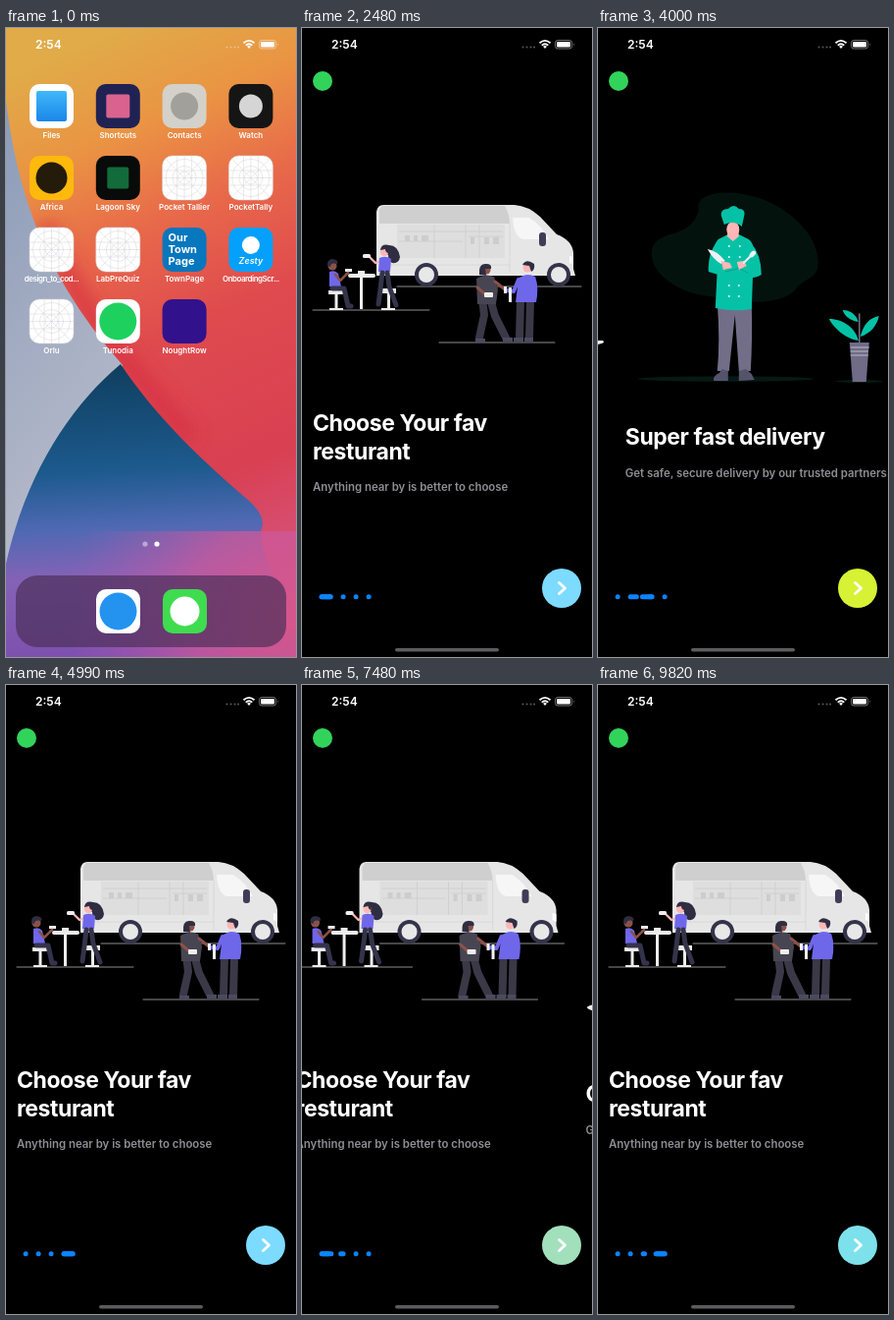
An HTML page for the animation above (9920 ms loop, 296 by 640 pixels).

```html
<!DOCTYPE html>
<html lang="en">
<head>
<meta charset="utf-8">
<title>Onboarding</title>
<style>
  html, body { margin: 0; width: 100%; height: 100%; overflow: hidden; background: #000; }
  svg { display: block; width: 100vw; height: 100vh; }
  text { font-family: Inter, "Noto Sans", sans-serif; fill: #fff; }
  .title { font-size: 23px; font-weight: 700; letter-spacing: -.45px; }
  .sub { font-size: 11.4px; font-weight: 600; fill: #8e8e93; }
  .label { font-size: 8px; font-weight: 600; text-anchor: middle; }
  .line { fill: none; stroke-linecap: round; stroke-linejoin: round; }
</style>
</head>
<body>
<svg viewBox="0 0 296 640">
<defs>
  <linearGradient id="warm" x1=".4" y1="0" x2=".6" y2="1">
    <stop offset="0" stop-color="#e0ab48"/><stop offset=".16" stop-color="#ea9443"/>
    <stop offset=".32" stop-color="#e8694a"/><stop offset=".5" stop-color="#df4a4e"/>
    <stop offset=".75" stop-color="#d94052"/><stop offset="1" stop-color="#d45a8c"/>
  </linearGradient>
  <linearGradient id="mist" x1="0" y1="0" x2=".3" y2="1">
    <stop offset="0" stop-color="#8b9bb8"/><stop offset="1" stop-color="#b9bccb"/>
  </linearGradient>
  <linearGradient id="sea" x1=".45" y1="0" x2=".5" y2="1">
    <stop offset="0" stop-color="#0f3f5f"/><stop offset=".36" stop-color="#1d5a8e"/>
    <stop offset=".55" stop-color="#4f69b3"/><stop offset=".72" stop-color="#8562b6"/>
    <stop offset="1" stop-color="#7d4fae"/>
  </linearGradient>
  <radialGradient id="blush" gradientUnits="userSpaceOnUse" cx="290" cy="600" r="230">
    <stop offset="0" stop-color="#d6568a"/><stop offset=".45" stop-color="#cb589b" stop-opacity=".75"/>
    <stop offset="1" stop-color="#a85ab0" stop-opacity="0"/>
  </radialGradient>
  <linearGradient id="files" x1="0" y1="0" x2="0" y2="1">
    <stop offset="0" stop-color="#3fb8f7"/><stop offset="1" stop-color="#1a86ea"/>
  </linearGradient>
  <filter id="soft" x="-50%" y="-50%" width="200%" height="200%"><feGaussianBlur stdDeviation="9"/></filter>
  <g id="blank" class="line" stroke="#d2d2d6" stroke-width=".5">
    <rect width="45" height="45" rx="10" fill="#fff"/>
    <path d="M0 22.5H45M22.5 0V45M3 3L42 42M42 3L3 42M15 0V45M30 0V45M0 15H45M0 30H45"/>
    <circle cx="22.5" cy="22.5" r="19"/><circle cx="22.5" cy="22.5" r="12"/><circle cx="22.5" cy="22.5" r="6.5"/>
  </g>
</defs>

<g id="home">
  <rect width="296" height="640" fill="url(#warm)"/>
  <path d="M40 200Q70 280 130 348L190 420" fill="none" stroke="#d62f42" stroke-width="20" opacity=".7" filter="url(#soft)"/>
  <path d="M0 74C9 150 30 212 62 266Q86 306 119 343L100 420L0 560Z" fill="url(#mist)"/>
  <path d="M117 342C154 398 207 446 248 481Q267 498 260 512C262 550 285 570 296 590V640H0V545C20 455 65 385 117 342Z" fill="url(#sea)"/>
  <rect y="512" width="296" height="128" fill="url(#blush)"/>
  <circle cx="142" cy="525" r="2.6" fill="#fff" opacity=".45"/><circle cx="154" cy="525" r="2.6" fill="#fff"/>
  <rect x="10" y="557" width="276" height="73" rx="22" fill="#4a2f58" opacity=".68"/>
  <g id="icons"></g>
  <rect id="iconShade" x="227" y="203" width="45" height="45" rx="10" opacity="0"/>
</g>
<rect id="veil" width="296" height="640" opacity="0"/>
<rect id="sheet"/>
<rect id="sheetTint" fill="#05a0fb"/>

<g id="app">
  <g id="pages">
    <g id="restaurant">
      <g class="line" stroke="#8d8d92" stroke-width="1"><path d="M97 263H285M11 287H130M140 320H258"/></g>
      <path d="M83 180H217Q231 181 243 192L260 210Q276 216 277 229V245L279 252H76V187Q77 180 83 180Z" fill="#e6e6e6"/>
      <path d="M82 181H207Q212 190 212 199H79V185Z" fill="#cfcfcf"/>
      <rect x="97" y="200" width="110" height="34" fill="#dedede"/>
      <path d="M99 207H205M99 217H164M170 212H205M135 200V234M167 200V234M181 200V234" stroke="#d0d0d0" fill="none"/>
      <path d="M105 211h5v6h-5zm9 0h4v6h-4zm8 0h7v6h-7zm50 2h4v7h-4zm14 0h5v7h-5zm9 0h6v7h-6z" fill="#cdcdcd"/>
      <path d="M215 193H232Q246 202 252 215H226Q216 213 215 193Z" fill="#f6f6f6"/>
      <rect x="242" y="208" width="7" height="14" rx="3" fill="#3f3d56"/>
      <path d="M77 241H213M212 199V249" stroke="#d8d8d8"/>
      <path d="M273 232l4 1v8l-4-2z" fill="#fff"/>
      <g fill="#e8e8e8" stroke="#35334a" stroke-width="4"><circle cx="127" cy="251" r="10"/><circle cx="262" cy="251" r="10"/></g>
      <g fill="#ececec">
        <rect x="47" y="250" width="28" height="4" rx="2"/><rect x="59" y="253" width="3" height="33"/>
        <path d="M27 267H43V271H36.500V285H42V287H28V285H33.500V271H27ZM80 265H96V270H90V285H95V287H81V285H87V270H80Z"/>
        <path d="M57 247h7v3h-7zM44 245h7v3h-7z"/>
      </g>
      <g>
        <circle cx="31" cy="242" r="4.500" fill="#8b5148"/><path d="M26 242Q25 236 31 235Q38 236 36 240Q29 238 29 243Z" fill="#2f2e41"/>
        <path d="M28 248Q34 246 37 250L40 263H28Z" fill="#6f67ea"/>
        <path class="line" d="M34 251L39 257L47 249" stroke="#8b5148" stroke-width="2.500"/>
        <path class="line" d="M31 265H43L47 283H50" stroke="#35334a" stroke-width="5"/>
      </g>
      <g>
        <path d="M80 226Q81 219 89 221Q98 221 100 233Q99 240 92 239Q88 237 88 231Z" fill="#2f2e41"/>
        <circle cx="84" cy="228" r="4" fill="#ffb6b6"/><path d="M80 226Q82 220 88 224L88 229Q85 228 85 225Z" fill="#2f2e41"/>
        <path class="line" d="M82 236L75 239L68 232" stroke="#ffb6b6" stroke-width="2.200"/>
        <path d="M79 234Q86 231 91 235L90 248H78Z" fill="#6f67ea"/>
        <path class="line" d="M82 249L80 266L78 281M87 249L89 263L96 282" stroke="#35334a" stroke-width="5"/>
        <rect x="62" y="230" width="8" height="4" rx="1.500" fill="#eee"/>
      </g>
      <g>
        <path class="line" d="M184 275L186 292L181 315M192 275L197 293L208 315" stroke="#3b3947" stroke-width="8"/>
        <path d="M178 255Q187 249 196 253L200 266L198 281H179Z" fill="#474551"/>
        <circle cx="188" cy="246" r="4.500" fill="#8b5148"/><path d="M181 251Q180 239 188 240Q194 240 193 245H187L188 252Z" fill="#2f2e41"/>
        <path class="line" d="M179 264L187 271M197 258L207 266" stroke="#8b5148" stroke-width="3"/>
        <rect x="186" y="269" width="9" height="5" rx="1" fill="#eee"/>
        <path d="M177 316h10v4h-10zm28-1h10v4h-10z" fill="#4c4a60"/>
      </g>
      <g>
        <path class="line" d="M223 278L222 315M233 278L232 315" stroke="#3b3947" stroke-width="8"/>
        <path d="M221 255Q229 248 238 253Q242 263 239 279H218Z" fill="#6f67ea"/>
        <path class="line" d="M221 256L216 268L209 267" stroke="#6f67ea" stroke-width="4"/>
        <circle cx="230" cy="244" r="4.500" fill="#ffb6b6"/><path d="M225 241Q229 234 237 240Q238 246 234 248L232 242Z" fill="#2f2e41"/>
        <path d="M206 263h3v7h-3zm5 1h3v15h-3z" fill="#f2f2f5"/>
        <path d="M216 315h10v4h-10zm11 0h9v4h-9z" fill="#4c4a60"/>
      </g>
      <text class="title" x="11" y="410">Choose Your fav</text>
      <text class="title" x="11" y="438.500">resturant</text>
      <text class="sub" x="11" y="470.500">Anything near by is better to choose</text>
    </g>

    <g transform="translate(298)">
      <path d="M10 328Q16 323 36 325L75 319L282 318Q287 321 271 323Q246 326 267 327Q276 330 268 333H229Q218 337 232 338Q229 341 185 339L67 335Q52 338 35 333Q13 333 10 328Z" fill="#f0f0f0"/>
      <path d="M94 302Q152 296 210 301L211 318Q195 326 154 325H100Q92 325 94 302Z" fill="#3f3d56"/>
      <path d="M91 291Q84 283 98 279L198 272Q206 278 212 280Q222 292 217 300L208 298L200 305Q190 300 180 305Q170 300 160 304Q150 299 140 304L132 300L122 305Q114 297 107 305L98 298L88 300Z" fill="#69b24e"/>
      <path d="M98 253Q87 256 89 270Q91 283 104 282L124 265ZM126 285Q148 293 173 278L160 270Z" fill="#e0575f"/>
      <path d="M101 257Q94 261 98 272Q105 278 117 270L110 257Z" fill="#e98288"/>
      <path d="M107 271Q136 276 166 270L212 253Q215 267 201 274Q171 284 132 278Z" fill="#61403f"/>
      <path d="M110 266L161 265L128 279L92 300Q91 295 100 282Z" fill="#f9d35c"/>
      <path d="M105 260Q156 265 209 253L211 259Q187 267 150 264Q122 272 105 260Z" fill="#69b24e"/>
      <path d="M98 258C95 232 122 209 153 209C188 209 208 232 210 253Q164 264 107 261Q99 262 98 258Z" fill="#45435c"/>
      <g class="line" stroke="#f1f1f1" stroke-width="2"><path d="M117 230l2-2m6-5l2-1m7 1l2-2m5-5l2 1m3 6l1-3m6-4l2 1m-4 8l2 2m10-10l2 1m-1 8l2 1m6-4l2 2"/></g>
      <path d="M54 319C42 314 35 302 34 293C45 298 53 308 54 319ZM55 318C57 303 67 289 81 285C78 298 68 312 55 318Z" fill="#484659"/>
      <path d="M54 319Q40 312 34 295M56 319C57 303 66 290 79 286" class="line" stroke="#0bb59e" stroke-width="1.500"/>
      <path d="M51 324l1-6h7l2 6z" fill="#aaa"/>
      <g>
        <path d="M221 245H246L248 270L254 314H242L235 268L231 316H221Q224 290 220 262Z" fill="#413f57"/>
        <path d="M214 320Q214 315 222 315L225 311L232 315V321H214ZM239 321L242 314L249 311L257 319Q256 322 239 321Z" fill="#51506f"/>
        <path class="line" d="M224 221L220 239L212 260M248 220L249 236L243 248" stroke="#ffb6b6" stroke-width="5"/>
        <path d="M224 211Q233 205 244 208Q252 214 251 228L247 249L222 248L225 231L220 225Q220 216 224 211Z" fill="#05c2a7"/>
        <path d="M225 196Q231 194 236 200L235 209L228 207Z" fill="#ffb6b6"/>
        <path d="M223 197Q223 190 232 189Q243 190 241 198Q238 205 234 201L231 196Z" fill="#3f3d56"/>
      </g>
      <text class="title" x="9" y="424">Compare prices</text>
      <text class="sub" x="9" y="456.500">Get the lowest price possible</text>
    </g>

    <g transform="translate(575)">
      <path d="M103 185C98 166 136 163 165 173C194 183 225 209 225 239C225 257 210 253 201 267C184 284 145 279 115 273C85 271 54 251 55 229C57 202 95 218 103 185Z" fill="#04120e"/>
      <g fill="#061913"><ellipse cx="131" cy="357" rx="90" ry="2.700"/><ellipse cx="267" cy="359.500" rx="24" ry="1.500"/></g>
      <path d="M122 280H157Q158 318 156 349H144L140 292L134 349H122Q125 318 122 280Z" fill="#736e88"/>
      <path d="M118 358Q118 354 124 351L127 347L133 349V359H119ZM144 359V349L151 347L157 352L160 358Z" fill="#55536c"/>
      <path d="M123 215L133 210H144L154 215Q160 219 159 232L157 286Q140 289 120 285L122 245L115 242Q118 220 123 215Z" fill="#05c2a7"/>
      <path d="M121 218Q112 231 113 248L130 253L134 244L124 239ZM156 218Q167 231 167 251Q157 257 142 252L141 243L156 240Z" fill="#05c2a7"/>
      <path class="line" d="M130 248L143 245M143 244L153 249" stroke="#07a08a"/>
      <path d="M133 203H143L144 212L138 217L132 212Z" fill="#ffb6b6"/>
      <ellipse cx="138" cy="205" rx="6.500" ry="8" fill="#ffb6b6"/>
      <path d="M129 200L126 191Q125 184 133 184Q139 178 144 184Q152 184 149 193L147 202Q139 195 129 200Z" fill="#05c2a7"/>
      <path d="M112 225Q121 226 130 237L126 240Q118 236 112 225Z" fill="#eef0f2"/>
      <path d="M126 237l9 2 2 5-9 2zm16 1l7-1 3 5-8 4z" fill="#ffb6b6"/>
      <path class="line" d="M149 239L157 231" stroke="#eef0f2" stroke-width="2"/><ellipse cx="158" cy="230" rx="2.500" ry="4" transform="rotate(40 158 230)" fill="#eef0f2"/>
      <g fill="#e8faf5"><circle cx="134" cy="222" r="1"/><circle cx="145" cy="222" r="1"/><circle cx="134" cy="233" r="1"/><circle cx="145" cy="233" r="1"/><circle cx="134" cy="262" r="1"/><circle cx="144" cy="262" r="1"/><circle cx="134" cy="273" r="1"/><circle cx="144" cy="273" r="1"/></g>
      <path class="line" d="M267 321V291" stroke="#777285" stroke-width="1.500"/>
      <path d="M266 318C255 317 242 307 236 296C250 296 263 305 266 318ZM268 314C271 302 277 295 287 293C285 303 278 311 268 314ZM266 299C257 298 252 293 250 287C258 287 264 292 266 299Z" fill="#05c2a7"/>
      <path d="M257 320H277L274 360H260Z" fill="#706b86"/><path d="M258 325H277M258 329H276M258 333H276" stroke="#bdbac9"/>
      <text class="title" x="28" y="424">Super fast delivery</text>
      <text class="sub" x="28" y="456.500">Get safe, secure delivery by our trusted partners</text>
    </g>
    <use href="#restaurant" x="888"/>
  </g>
  <circle cx="21" cy="54" r="10" fill="#32d35b"/>
  <g id="dots" fill="#0a84ff"></g>
  <g id="button">
    <circle id="disc" cx="265" cy="570" r="20"/>
    <path class="line" d="M262.500 564.500L268.500 570L262.500 575.500" stroke="#fff" stroke-width="2.800"/>
  </g>
</g>
<rect id="homeBar" x="95" y="631" width="106" height="3.600" rx="1.800" fill="#5c5c5e"/>

<g fill="#fff">
  <text x="30" y="21" font-size="12" font-weight="600">2:54</text>
  <g opacity=".35"><circle cx="225.500" cy="19.500" r="1"/><circle cx="229.500" cy="19.500" r="1"/><circle cx="233.500" cy="19.500" r="1"/><circle cx="237" cy="19.500" r="1"/></g>
  <path d="M242.500 15.200Q248 10.500 253.500 15.200M244.700 17.600Q248 14.900 251.300 17.600" fill="none" stroke="#fff" stroke-width="1.800"/>
  <path d="M246 18.800Q248 17.300 250 18.800L248 21Z"/>
  <rect x="258.500" y="12.500" width="17" height="8.500" rx="2.600" fill="none" stroke="#fff" stroke-opacity=".45"/>
  <rect x="260" y="14" width="14" height="5.500" rx="1.300"/><path d="M277 15Q278.500 16.800 277 18.500Z" opacity=".5"/>
</g>
</svg>

<script>
const $ = id => document.getElementById(id);
const clamp = x => Math.min(1, Math.max(0, x));
const mix = (a, b, p) => a + (b - a) * p;
const set = (el, attrs) => { for (const k in attrs) el.setAttribute(k, attrs[k]); };
const smooth = p => p * p * (3 - 2 * p);
const cubicInOut = p => p < .5 ? 4 * p ** 3 : 1 - 4 * (1 - p) ** 3;
const quadOut = p => 1 - (1 - p) ** 2;

// Home screen icons
const tile = (fill, inner = '') => `<rect width="45" height="45" rx="10" fill="${fill}"/>${inner}`;
const square = (fill, size = 25) => `<rect x="${22.5 - size / 2}" y="${22.5 - size / 2}" width="${size}" height="${size}" rx="2" fill="${fill}"/>`;
const circle = (fill, r = 15) => `<circle cx="22.5" cy="22.5" r="${r}" fill="${fill}"/>`;
const blank = '<use href="#blank"/>';
const newsText = ['Our', 'Town', 'Page'].map((word, i) =>
  `<text x="6" y="${14 + i * 12}" font-size="11" font-weight="700">${word}</text>`).join('');
const icons = [
  ['Files', tile('#fff', square('url(#files)', 31))],
  ['Shortcuts', tile('#202254', square('#d9638e', 24))],
  ['Contacts', tile('#d3d1c9', circle('#a2a09b', 14))],
  ['Watch', tile('#151515', circle('#d5d5d5', 12))],
  ['Africa', tile('#fdb90c', circle('#241b0a', 16))],
  ['Lagoon Sky', tile('#080b09', square('#126b3b', 22))],
  ['Pocket Tallier', blank],
  ['PocketTally', blank],
  ['design_to_cod...', blank],
  ['LabPreQuiz', blank],
  ['TownPage', tile('#0877bd', newsText)],
  ['OnboardingScr...', tile('#05a0fb', '<circle cx="22.5" cy="18" r="9" fill="#fff"/><text x="22.5" y="37" font-size="9" font-style="italic" font-weight="600" text-anchor="middle">Zesty</text>')],
  ['Orlu', blank],
  ['Tunodia', tile('#fff', circle('#1ed15f', 19))],
  ['NoughtRow', tile('#32128c')],
];
const place = (x, y, art, label) => `<g transform="translate(${x} ${y})">${art}
  <text class="label" x="22.5" y="55"${label.length > 14 ? ' letter-spacing="-.5"' : ''}>${label}</text></g>`;
$('icons').innerHTML = icons.map(([label, art], i) =>
  place(24 + (i % 4) * 67.8, 57 + (i >> 2) * 73, art, label)).join('')
  + place(92, 571, tile('#fff', circle('#2493ef', 19)), '')
  + place(160, 571, tile('#3fdc4f', circle('#fff', 15)), '');

$('dots').innerHTML = '<rect y="576.3" height="5" rx="2.5"/>'.repeat(5);
const dots = [...$('dots').children];

// Page moves: start, duration, from, to, press time (taps only)
const moves = [
  [2800, 500, 0, 1, 2830], [3622, 500, 1, 2, 3640], [4390, 500, 2, 3, 4415],
  [6090, 450, 3, 2], [6574, 450, 2, 1], [7110, 490, 1, 0],
  [7740, 500, 0, 1, 7765], [8450, 500, 1, 2, 8500], [9310, 500, 2, 3, 9225],
];
const colors = [[125, 219, 255], [255, 235, 18], [124, 255, 128], [125, 219, 255]];

function pageState(t) {
  const state = { pos: 0, from: 0, to: 0, blend: 1, alpha: 1 };
  for (const [start, length, from, to, press] of moves) {
    if (press && t >= press) state.alpha = mix(.48, 1, clamp((t - start - 90) / 200));
    if (t < start) continue;
    const p = clamp((t - start) / length);
    state.pos = mix(from, to, press ? cubicInOut(p) : quadOut(p));
    const halfway = start + length * (press ? .5 : 1 - Math.SQRT1_2);
    if (t >= halfway) Object.assign(state, { from, to, blend: smooth(clamp((t - halfway) / 350)) });
  }
  return state;
}

function drawHome(t) {
  const open = 1 - (1 - clamp((t - 1430) / 600)) ** 3;
  const started = t >= 1430;
  set($('iconShade'), { opacity: t >= 1300 ? .4 : 0 });
  set($('home'), {
    transform: `translate(148 320) scale(${1 + .12 * open}) translate(-148 -320)`,
    display: open < 1 ? 'inline' : 'none',
  });
  set($('veil'), { opacity: .4 * open });
  const frame = {
    x: mix(227.4, 0, open), y: mix(203, 0, open), width: mix(45, 296, open), height: mix(45, 640, open),
    rx: open < 1 ? mix(10, 26, open) : 0,
  };
  set($('sheet'), { ...frame, opacity: started ? clamp(open * 6) : 0 });
  set($('sheetTint'), { ...frame, opacity: started ? clamp(open * 6) * clamp(1 - open * 1.8) : 0 });
  set($('homeBar'), { opacity: clamp(open * 4 - 3) });
}

function drawApp(t) {
  const { pos, from, to, blend, alpha } = pageState(t);
  set($('app'), { opacity: clamp((t - 2220) / 260) });
  set($('pages'), { transform: `translate(${-296 * pos})` });
  const channels = colors[from].map((c, i) => Math.round(mix(c, colors[to][i], blend)));
  set($('disc'), { fill: `rgb(${channels})` });
  set($('button'), { opacity: alpha });

  let x = 17.6;
  for (let i = 0; i < 4; i++) {
    const width = 5 + 9 * mix(i === from, i === to, blend);
    set(dots[i], { x, width });
    x += width + 8;
  }
  set(dots[4], { x: 17.6 + 13 * pos, width: 14 });
}

function draw() {
  const t = performance.now() % 9920;
  drawHome(t);
  drawApp(t);
  requestAnimationFrame(draw);
}
draw();
</script>
</body>
</html>
```
